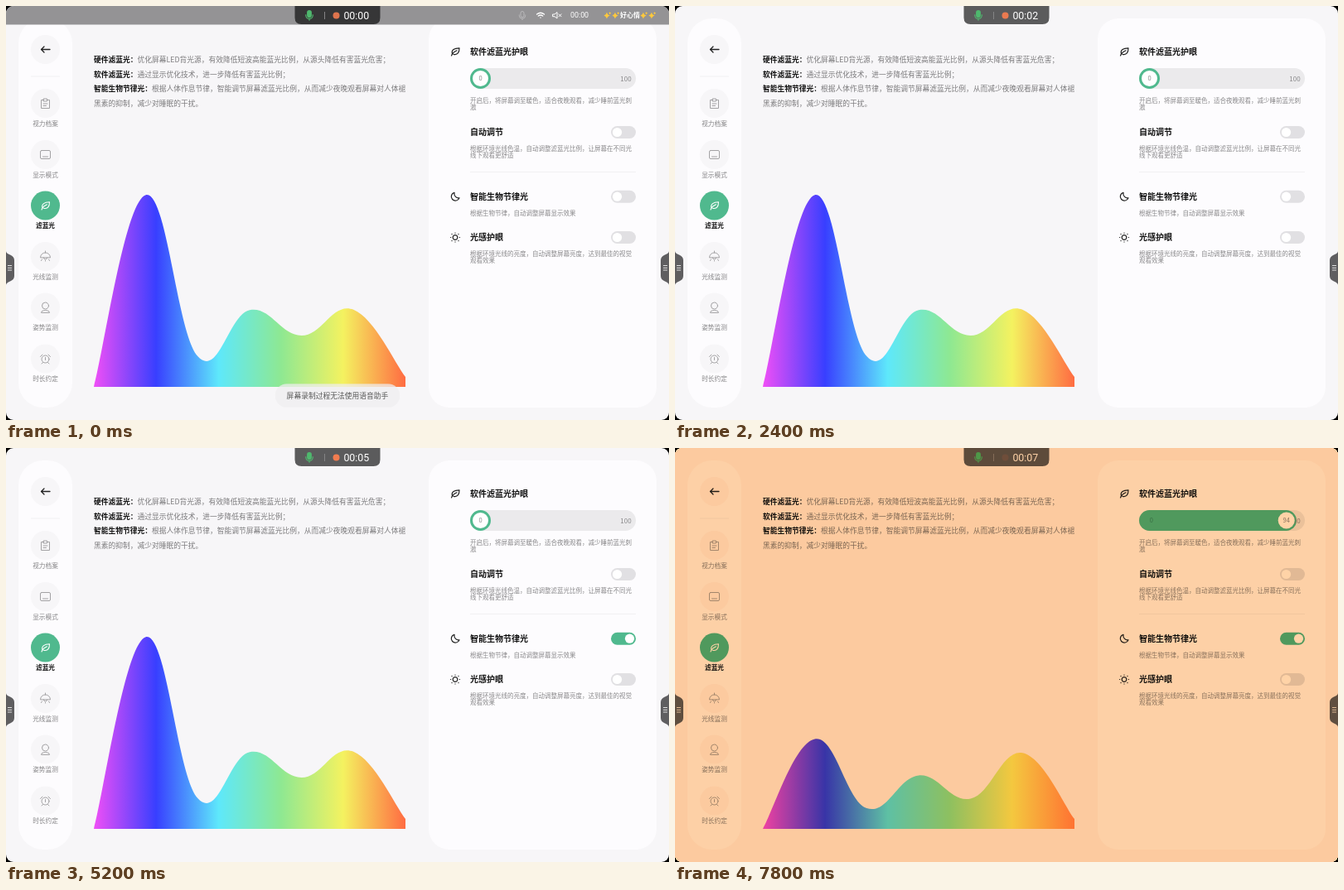
An HTML page for the animation above (8 s loop, 800 by 500 pixels).

```html
<!DOCTYPE html>
<html lang="zh-CN">
<head>
<meta charset="utf-8">
<title>滤蓝光</title>
<style>
  html, body { margin: 0; width: 100%; height: 100%; overflow: hidden; background: #000; }
  svg { display: block; }
  text { font-family: "Noto Sans CJK SC", "Noto Sans CJK", "Noto Sans", sans-serif; }
  .icon { fill: none; stroke-linecap: round; stroke-linejoin: round; }
  .body { font-size: 8.75px; fill: #7b7a7c; }
  .body .lead, .title { font-weight: 700; fill: #111; }
  .title { font-size: 10px; }
  .note { font-size: 7.5px; fill: #89888a; }
  .label { font-size: 7.65px; fill: #858486; text-anchor: middle; }
  .label.on { font-weight: 700; fill: #111; }
  .num { font-family: Roboto, sans-serif; }

  .step { animation: 8s steps(1, end) infinite; }
  .warm { visibility: hidden; animation-name: appear; }
  .cool { animation-name: vanish; }
  .page { animation-name: page; }
  .ember { animation-name: ember; }
  .tint { mix-blend-mode: multiply; }
  .track { animation-name: track; }
  .thumb { animation-name: thumb; }
  .status { animation-name: status; }
  .live { animation-name: live; }
  .toast { animation-name: toast; transform-origin: 400px 470.5px; }
  .dot { animation-name: blink; animation-duration: 1s; }
  .digits { animation: count 8s steps(8, end) infinite; }

  @keyframes appear { 0% { visibility: hidden; } 67.5%, 100% { visibility: visible; } }
  @keyframes vanish { 0% { visibility: visible; } 67.5%, 100% { visibility: hidden; } }
  @keyframes page { 0% { fill: #f7f6f8; } 67.5%, 100% { fill: #fcf5f3; } }
  @keyframes ember { 0% { stop-color: #ff6c42; } 67.5%, 100% { stop-color: #ff8a4c; } }
  @keyframes track { 0% { fill: #e1e0e3; } 62.5%, 100% { fill: #50b98e; } }
  @keyframes thumb { 0% { transform: none; } 62.5%, 100% { transform: translateX(15px); } }
  @keyframes status {
    0% { transform: none; }
    27.5% { transform: translateY(-11px); }
    30%, 100% { transform: translateY(-24px); }
  }
  @keyframes live { 0% { opacity: .35; } 5%, 100% { opacity: 1; } }
  @keyframes toast {
    0% { opacity: .75; transform: scale(.99); }
    5% { opacity: 1; transform: none; }
    27.5% { opacity: .5; transform: none; }
    30%, 100% { opacity: 0; transform: none; }
  }
  @keyframes blink {
    0% { opacity: .9; } 20% { opacity: 1; } 40% { opacity: .95; }
    60% { opacity: .45; } 80%, 100% { opacity: .12; }
  }
  @keyframes count { to { transform: translateY(-160px); } }
</style>
</head>
<body>
<svg width="800" height="500" viewBox="0 0 800 500">
  <defs>
    <linearGradient id="spectrum" gradientUnits="userSpaceOnUse" x1="106" x2="482" y1="0" y2="0">
      <stop offset="0" stop-color="#f04ff6"/>
      <stop offset=".2" stop-color="#383fff"/>
      <stop offset=".4" stop-color="#5ee8fb"/>
      <stop offset=".6" stop-color="#8ee892"/>
      <stop offset=".8" stop-color="#f4f260"/>
      <stop class="step ember" offset="1"/>
    </linearGradient>
    <clipPath id="screen"><rect width="800" height="500" rx="9"/></clipPath>
    <g id="leaf">
      <path d="M-3.5 3C-5-2-1-4 5-4.2 5 1 3 4.5-2 3.3M-4.5 5C-3.5 2-1 0 2-1.3"/>
    </g>
    <g id="mic">
      <rect x="-2" y="-5" width="4" height="7" rx="2"/>
      <path d="M-3.7-1V0A3.7 3.7 0 0 0 3.7 0V-1M0 3.7V5.5" fill="none"/>
    </g>
    <g id="grip">
      <path d="M0 296Q0 298.500 5 300.500Q10 302.500 10 307V326Q10 330.500 5 332.500Q0 334.500 0 337Z" fill="#5f5e60"/>
      <path d="M2 313.500H7M2 316.300H7M2 319H7" stroke="#eee" stroke-width=".9"/>
    </g>
    <g id="sparkle" fill="#ffc93c">
      <path d="M-1-3.500Q-.3-.2 3 .6Q-.3 1.400-1 4.500Q-1.700 1.400-4.500 .6Q-1.700-.2-1-3.500Z"/>
      <path d="M2.700-4Q3-2.600 4.300-2.300Q3-2 2.700-.6Q2.400-2 1.100-2.300Q2.400-2.600 2.700-4Z"/>
    </g>
    <g id="off">
      <rect width="30" height="15" rx="7.500" fill="#e1e0e3"/>
      <circle cx="7.500" cy="7.500" r="5.600" fill="#fff"/>
    </g>
  </defs>

  <g clip-path="url(#screen)">
    <rect class="step page" width="800" height="500"/>
    <rect x="15" y="15" width="65" height="470" rx="30" fill="#fdfcfe"/>
    <rect x="510" y="15" width="275" height="470" rx="25" fill="#fdfcfe"/>

    <!-- sidebar -->
    <g class="step page">
      <circle cx="47.500" cy="52.500" r="17.500"/>
      <circle cx="47.500" cy="117.500" r="17.500"/>
      <circle cx="47.500" cy="179.500" r="17.500"/>
      <circle cx="47.500" cy="241" r="17.500" fill="#50b98e"/>
      <circle cx="47.500" cy="302.500" r="17.500"/>
      <circle cx="47.500" cy="364" r="17.500"/>
      <circle cx="47.500" cy="426" r="17.500"/>
    </g>
    <path d="M30 85H65M560 200.500H760" stroke="#f1f0f2"/>
    <path class="icon" d="M53 52.500H42.500M46 49L42.500 52.500L46 56" stroke="#222" stroke-width="1.300"/>
    <g class="icon" stroke="#a3a2a4">
      <g transform="translate(47.500 118)">
        <path d="M-2-4.500H-5V5.500H5V-4.500H2M-2-6H2V-3H-2ZM-2.500 0H2.500M-2.500 2.500H1"/>
      </g>
      <g transform="translate(47.500 179.500)">
        <rect x="-6" y="-5" width="12" height="10" rx="1.500"/><path d="M-3 2.500H3"/>
      </g>
      <use href="#leaf" transform="translate(47.500 241)" stroke="#fff" stroke-width="1.100"/>
      <g transform="translate(47.500 302)">
        <path d="M0-6V-4M-6 1.500C-5.500-6 5.500-6 6 1.500ZM-2 2A2 2 0 0 0 2 2M-4 4L-5 5.500M4 4L5 5.500M0 5.500V6"/>
      </g>
      <g transform="translate(47.500 364)">
        <circle cy="-2" r="4"/><path d="M-5 6C-5 2.500 5 2.500 5 6Z"/>
      </g>
      <g transform="translate(47.500 426.500)">
        <circle r="4.500"/><path d="M0-2V1M-6-3L-3.500-5.500M6-3L3.500-5.500M-3 4L-4.500 5.500M3 4L4.500 5.500"/>
      </g>
    </g>
    <text class="label" x="47.500" y="145">视力档案</text>
    <text class="label" x="47.500" y="206.500">显示模式</text>
    <text class="label on" x="47.500" y="268">滤蓝光</text>
    <text class="label" x="47.500" y="329.500">光线监测</text>
    <text class="label" x="47.500" y="391">姿势监测</text>
    <text class="label" x="47.500" y="453">时长约定</text>

    <!-- description and spectrum -->
    <g class="body">
      <text x="106" y="68.300"><tspan class="lead">硬件滤蓝光：</tspan>优化屏幕LED背光源，有效降低短波高能蓝光比例，从源头降低有害蓝光危害；</text>
      <text x="106" y="85.800"><tspan class="lead">软件滤蓝光：</tspan>通过显示优化技术，进一步降低有害蓝光比例；</text>
      <text x="106" y="103.300"><tspan class="lead">智能生物节律光：</tspan>根据人体作息节律，智能调节屏幕滤蓝光比例，从而减少夜晚观看屏幕对人体褪</text>
      <text x="106" y="120.800">黑素的抑制，减少对睡眠的干扰。</text>
    </g>
    <g fill="url(#spectrum)">
      <path id="coolCurve" class="step cool"/>
      <path id="warmCurve" class="step warm"/>
    </g>

    <!-- settings -->
    <g class="icon" stroke="#222" stroke-width="1.200">
      <use href="#leaf" transform="translate(542 55)"/>
      <path d="M541 225.300A5 5 0 1 0 547 231.800A5.300 5.300 0 0 1 541 225.300Z"/>
      <g transform="translate(542 279.500)">
        <circle r="2.800"/>
        <path d="M0-5.500V-5.300M0 5.500V5.300M-5.500 0H-5.300M5.500 0H5.300M-4-4L-3.900-3.900M4-4L3.900-3.900M-4 4L-3.900 3.900M4 4L3.900 3.900"/>
      </g>
    </g>
    <text class="title" x="560" y="58.700">软件滤蓝光护眼</text>
    <text class="title" x="560" y="156.200">自动调节</text>
    <text class="title" x="560" y="233.800">智能生物节律光</text>
    <text class="title" x="560" y="283">光感护眼</text>
    <g class="note">
      <text x="560" y="117">开启后，将屏幕调至暖色，适合夜晚观看，减少睡前蓝光刺</text>
      <text x="560" y="125.300">激</text>
      <text x="560" y="174.500">根据环境光线色温，自动调整滤蓝光比例，让屏幕在不同光</text>
      <text x="560" y="183">线下观看更舒适</text>
      <text x="560" y="252.500">根据生物节律，自动调整屏幕显示效果</text>
      <text x="560" y="301.500">根据环境光线的亮度，自动调整屏幕亮度，达到最佳的视觉</text>
      <text x="560" y="310">观看效果</text>
    </g>
    <rect x="560" y="75" width="200" height="25" rx="12.500" fill="#ebeaec"/>
    <g class="note" text-anchor="middle">
      <rect class="step warm" x="560" y="75" width="190" height="25" rx="12.500" fill="#50b98e"/>
      <text x="748" y="90.500" font-size="8">100</text>
      <g class="step cool">
        <circle cx="572.500" cy="87.500" r="11" fill="#fff" stroke="#50b98e" stroke-width="3"/>
        <text x="572.500" y="90.300">0</text>
      </g>
      <g class="step warm">
        <text x="574.800" y="90.300" fill="#3a8868">0</text>
        <circle cx="737.700" cy="87.500" r="10" fill="#fff"/>
        <text x="737.700" y="90.300">94</text>
      </g>
    </g>
    <use href="#off" x="730" y="145"/>
    <use href="#off" x="730" y="272"/>
    <rect class="step track" x="730" y="222.700" width="30" height="15" rx="7.500"/>
    <circle class="step thumb" cx="737.500" cy="230.200" r="5.600" fill="#fff"/>

    <use href="#grip"/>
    <use href="#grip" transform="matrix(-1 0 0 1 800 0)"/>

    <g class="step toast">
      <rect x="324" y="456" width="152" height="29" rx="14.500" fill="#efeef0"/>
      <text x="400" y="473.700" font-size="8.860" font-weight="500" fill="#222" text-anchor="middle">屏幕录制过程无法使用语音助手</text>
    </g>

    <!-- status bar -->
    <g class="step status">
      <rect width="800" height="22.500" fill="#949395"/>
      <g class="step live" stroke="#fff"><use href="#mic" transform="translate(623 11.500)" fill="none"/></g>
      <g class="icon" stroke="#fff">
        <path d="M640.500 10Q645 6.500 649.500 10M642.300 12Q645 10 647.700 12M645 14V14.200" stroke-width="1.300"/>
        <path d="M660 10H662L665 7.500V15L662 12.700H660ZM667 9.800L670 12.800M670 9.800L667 12.800"/>
      </g>
      <text class="num" x="681" y="14.300" font-size="8.900" fill="#fff">00:00</text>
      <use href="#sparkle" x="726" y="11"/>
      <use href="#sparkle" x="736" y="11"/>
      <text x="741" y="14" font-size="8" font-weight="700" fill="#fff">好心情</text>
      <use href="#sparkle" x="770" y="11"/>
      <use href="#sparkle" x="780" y="11"/>
    </g>

    <!-- recorder -->
    <path d="M348.500 0H451.500V14Q451.500 22 443.500 22H356.500Q348.500 22 348.500 14Z" fill="#000" fill-opacity=".63"/>
    <use href="#mic" transform="translate(366 11.300) scale(1.150)" fill="#4fb86e" stroke="#4fb86e"/>
    <path d="M384.500 7V16" stroke="#858486"/>
    <circle class="step dot" cx="398.500" cy="11.500" r="4" fill="#f27c50"/>
    <g class="num" font-size="12.400" fill="#fff">
      <text class="num" x="431.300" y="16" text-anchor="end">00:0</text>
      <svg x="431.300" y="0" width="9" height="20" overflow="hidden">
        <g class="digits">
          <text class="num" y="16">0</text><text class="num" y="36">1</text>
          <text class="num" y="56">2</text><text class="num" y="76">3</text>
          <text class="num" y="96">4</text><text class="num" y="116">5</text>
          <text class="num" y="136">6</text><text class="num" y="156">7</text>
        </g>
      </svg>
    </g>

    <rect class="step warm tint" width="800" height="500" fill="#ffd3a7"/>
  </g>
</svg>
<script>
  const LEFT = 106, RIGHT = 482, BASE = 460, TENSION = 0.2;

  // Cubic line through evenly spaced heights, closed along the base.
  function area(heights) {
    const last = heights.length - 1;
    const points = heights.map((y, i) => [LEFT + (RIGHT - LEFT) * i / last, y]);
    const at = i => points[Math.max(0, Math.min(last, i))];
    const handle = (i, side) => at(i).map((v, k) => v + side * TENSION * (at(i + 1)[k] - at(i - 1)[k]));
    let d = `M${points[0]}`;
    for (let i = 1; i <= last; i++) d += `C${handle(i - 1, 1)} ${handle(i, -1)} ${points[i]}`;
    return `${d}V${BASE}H${LEFT}Z`;
  }

  document.getElementById("coolCurve").setAttribute("d", area([460, 228.2, 423, 367.3, 398, 366.7, 448]));
  document.getElementById("warmCurve").setAttribute("d", area([460, 351.5, 435, 395.4, 423.5, 368.3, 448]));
</script>
</body>
</html>
```
